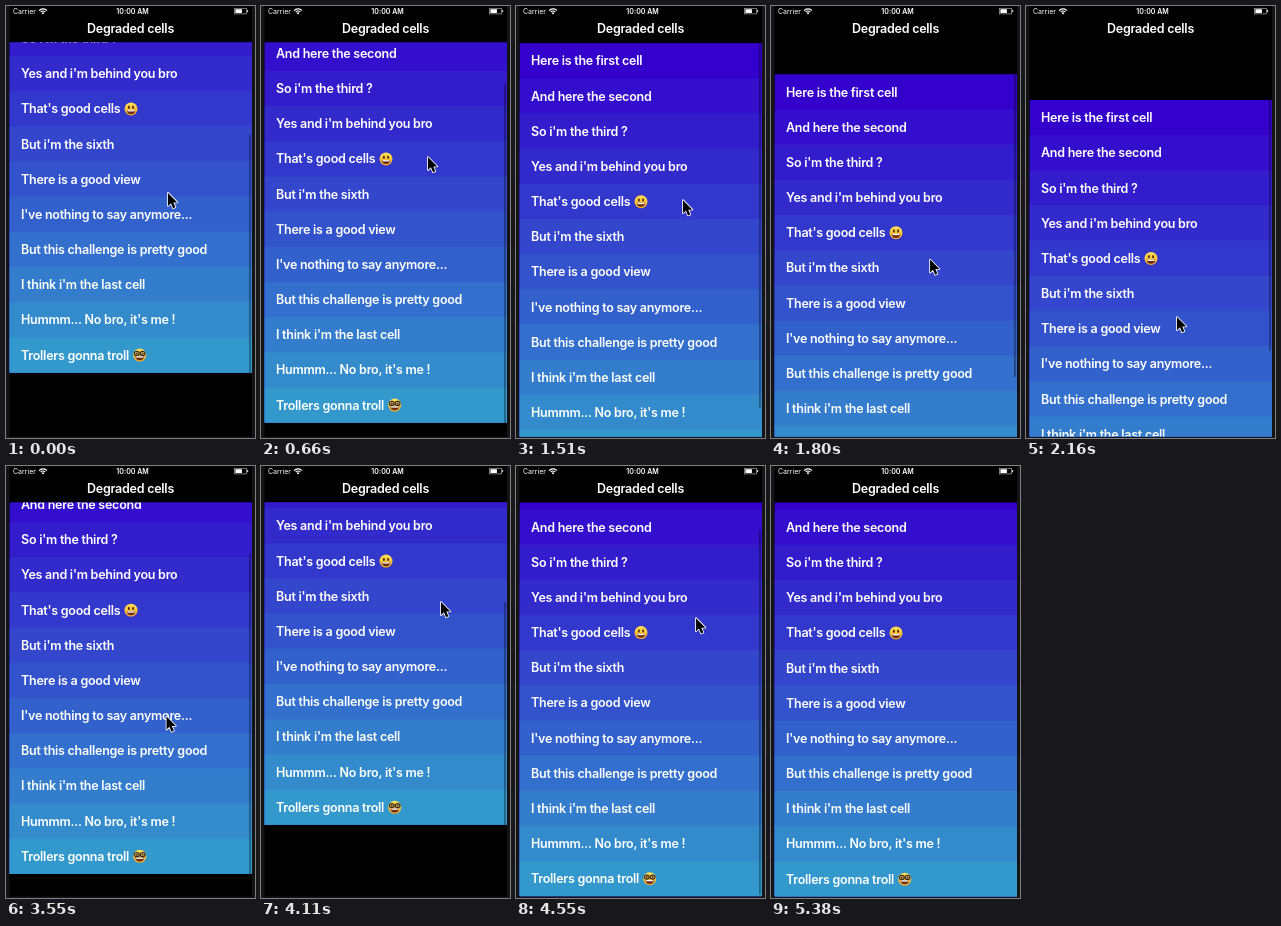
Animation of 249x432 px, one loop 5800 ms. Source, as an HTML page with a canvas:

```html
<!DOCTYPE html>
<html lang="en">
<head>
<meta charset="utf-8">
<title>Degraded cells</title>
<style>
  html, body { margin: 0; width: 100%; height: 100%; overflow: hidden; background: #000; }
  canvas { display: block; width: 249px; height: 432px; }
</style>
</head>
<body>
<canvas width="249" height="432"></canvas>
<script>
const canvas = document.querySelector('canvas');
const ctx = canvas.getContext('2d');

const LOOP = 5800, LEFT = 3.5, WIDTH = 242.5;
const TOP = 36.5, BOTTOM = 430.5, VIEW = BOTTOM - TOP;
const ROW = 35.17;
const labels = [
  'Here is the first cell', 'And here the second', "So i'm the third ?",
  "Yes and i'm behind you bro", "That's good cells", "But i'm the sixth",
  'There is a good view', "I've nothing to say anymore...",
  'But this challenge is pretty good', "I think i'm the last cell",
  "Hummm... No bro, it's me !", 'Trollers gonna troll'
];
const CONTENT = ROW * labels.length;
const END = BOTTOM - CONTENT; // list top when scrolled to the end

// Pointer path: time, x, y
const path = [
  [0, 162, 187], [400, 167, 151], [700, 167, 151], [1200, 167, 165], [1360, 167, 165],
  [1510, 167, 194], [1950, 155, 284], [2160, 151, 311], [2435, 147, 330], [3170, 147, 330],
  [4100, 180, 136], [4500, 180, 136], [4950, 180, 279], [5380, 208, 434], [LOOP, 208, 434]
];
const drags = [
  { from: 0, to: 400, listTop: END, grabY: 321, spring: 12 },
  { from: 1360, to: 2435, listTop: END, grabY: 165, spring: 12.4 },
  { from: 3215, to: 4100, listTop: TOP, grabY: 321, spring: 16.5 }
];

const clamp = (v, lo, hi) => Math.min(hi, Math.max(lo, v));

function pointerAt(t) {
  const i = path.findIndex((p, n) => n > 0 && t <= p[0]);
  const [t0, x0, y0] = path[i - 1], [t1, x1, y1] = path[i];
  const k = (t - t0) / (t1 - t0);
  return { x: x0 + (x1 - x0) * k, y: y0 + (y1 - y0) * k };
}

// Rubber-band drag, then a critically damped return
function scrollAt(t) {
  const drag = drags.filter(d => d.from <= t).pop();
  const raw = drag.listTop + pointerAt(Math.min(t, drag.to)).y - drag.grabY;
  const rest = clamp(raw, END, TOP);
  const over = Math.abs(raw - rest);
  const s = Math.max(0, t - drag.to) / 1000 * drag.spring;
  const pull = VIEW * (1 - 1 / (over * 0.57 / VIEW + 1)) * (1 + s) * Math.exp(-s);
  return {
    top: rest + Math.sign(raw - rest) * pull,
    pull,
    barAlpha: clamp(1 - (t - drag.to - 620) / 200, 0, 1)
  };
}

function text(str, x, y, size, weight = 600, align = 'left') {
  ctx.font = `${weight} ${size}px Inter, sans-serif`;
  ctx.letterSpacing = size > 10 ? '-0.25px' : '0px';
  ctx.textAlign = align;
  ctx.fillStyle = '#fff';
  ctx.fillText(str, x, y);
}

function ellipse(x, y, rx, ry, fill, from = 0, to = Math.PI * 2) {
  ctx.beginPath();
  ctx.ellipse(x, y, rx, ry, 0, from, to);
  ctx.fillStyle = fill;
  ctx.fill();
}

function face(x, y, nerd) {
  const shade = ctx.createLinearGradient(0, y - 6.5, 0, y + 6.5);
  shade.addColorStop(0, '#ffe254');
  shade.addColorStop(1, '#f5a623');
  ellipse(x, y, 6.5, 6.5, shade);
  ellipse(x, y + 1.2, 4.2, 4, '#6b2c10', 0, Math.PI);
  ctx.fillStyle = '#fff';
  ctx.fillRect(x - 3.6, y + 1.2, 7.2, 1.3);
  for (const side of [-1, 1]) {
    const ex = x + side * (nerd ? 2.9 : 2.1), ey = y - 1.7;
    if (nerd) {
      ellipse(ex, ey, 2.4, 2, '#f3cf6a');
      ctx.strokeStyle = '#3a2b20';
      ctx.lineWidth = 1.2;
      ctx.stroke();
    }
    ellipse(ex, ey, 0.9, nerd ? 1 : 1.7, '#4a2410');
  }
}

function drawList({ top, pull, barAlpha }) {
  ctx.save();
  ctx.beginPath();
  ctx.rect(LEFT, TOP, WIDTH, VIEW);
  ctx.clip();
  labels.forEach((label, i) => {
    const y = top + i * ROW;
    ctx.fillStyle = `rgb(51, ${Math.round(153 * i / 11)}, 204)`;
    ctx.fillRect(LEFT, y, WIDTH, CONTENT - i * ROW);
    text(label, 15, y + 22.3, 12.5);
    if (i === 4) face(125, y + 17.8, false);
    if (i === 11) face(133.7, y + 17.8, true);
  });
  const inset = 2, track = VIEW - 2 * inset;
  const length = track * VIEW / CONTENT - pull;
  const progress = clamp((TOP - top) / (TOP - END), 0, 1);
  ctx.fillStyle = `rgba(0, 0, 0, ${0.35 * barAlpha})`;
  ctx.fillRect(243, TOP + inset + (track - length) * progress, 1.8, length);
  ctx.restore();
}

function drawHeader() {
  text('Carrier', 7, 7.7, 7, 400);
  text('10:00 AM', 126.5, 7.7, 7, 600, 'center');
  text('Degraded cells', 124.5, 27, 12.5, 600, 'center');

  ctx.strokeStyle = '#fff';
  ctx.lineWidth = 1.2;
  for (const r of [3, 5.2]) {
    ctx.beginPath();
    ctx.arc(37, 8, r, -Math.PI * 0.77, -Math.PI * 0.23);
    ctx.stroke();
  }
  ellipse(37, 7.3, 1, 1, '#fff');

  ctx.strokeStyle = '#aaa';
  ctx.lineWidth = 0.7;
  ctx.strokeRect(228.5, 2.3, 12, 5.6);
  ctx.fillStyle = '#fff';
  ctx.fillRect(229.4, 3.2, 6.5, 3.8);
  ctx.fillRect(241.2, 4, 0.9, 2.2);
}

function drawPointer({ x, y }) {
  const arrow = new Path2D('M0 0V14.2L3.2 11.2L5.5 16.6L8 15.5L5.7 10.3H10.2Z');
  ctx.save();
  ctx.translate(x, y);
  ctx.scale(0.92, 0.92);
  ctx.lineJoin = 'round';
  ctx.lineWidth = 1.8;
  ctx.strokeStyle = '#fff';
  ctx.stroke(arrow);
  ctx.fillStyle = '#000';
  ctx.fill(arrow);
  ctx.restore();
}

function draw(now) {
  const t = now % LOOP;
  ctx.fillStyle = '#141414';
  ctx.fillRect(0, 0, 249, 432);
  ctx.fillStyle = '#000';
  ctx.fillRect(LEFT, 0, WIDTH, BOTTOM);
  drawList(scrollAt(t));
  drawHeader();
  drawPointer(pointerAt(t));
}

const start = performance.now();
function tick() {
  draw(performance.now() - start);
  requestAnimationFrame(tick);
}
tick();
</script>
</body>
</html>
```
